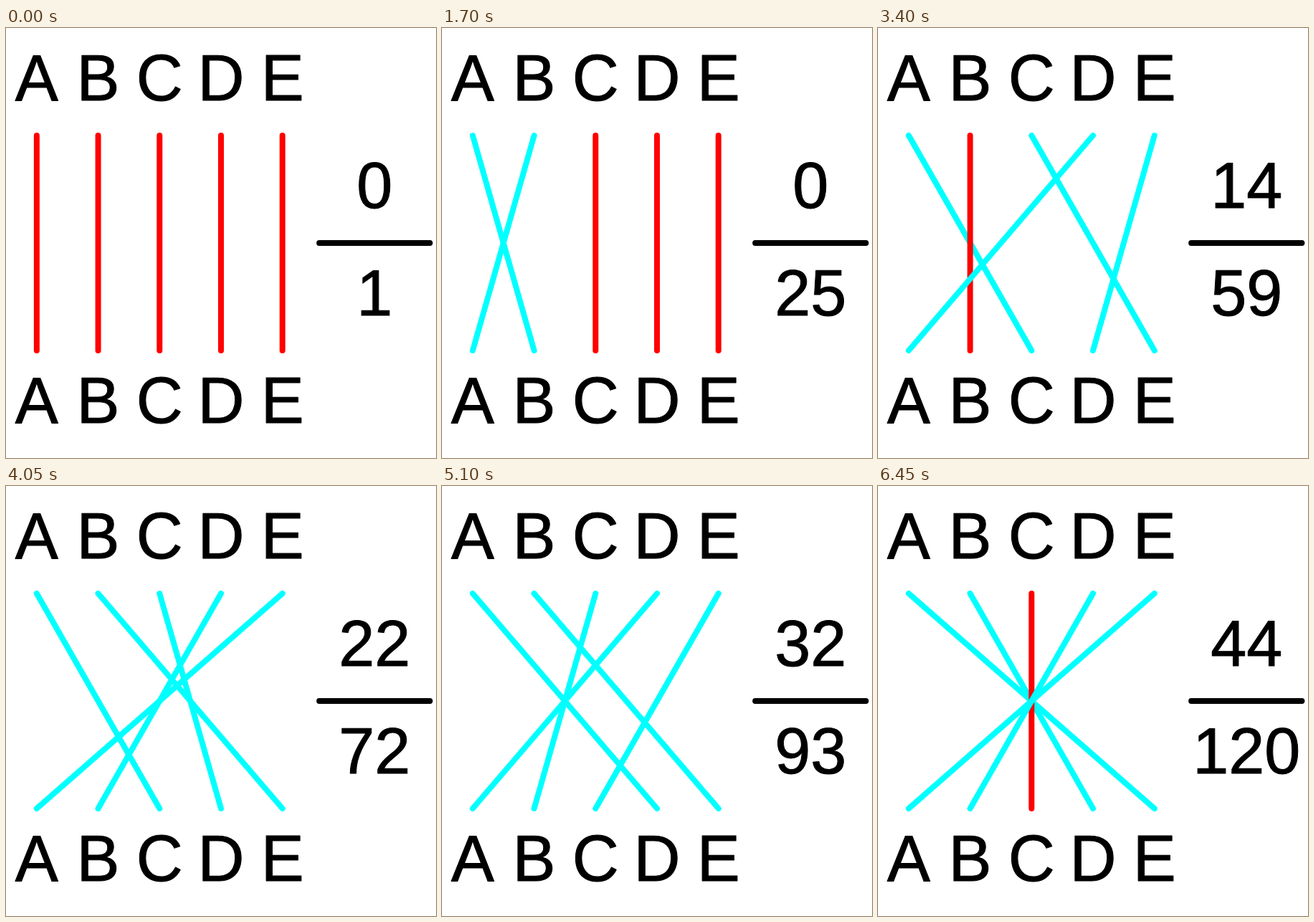
Write an HTML page with a canvas that moves like this. It is 600 by 600 pixels and loops after 7 s.

```html
<!DOCTYPE html>
<html>
<head>
<meta charset="utf-8">
<style>
  html, body { margin: 0; width: 100%; height: 100%; overflow: hidden; background: #fff; }
  canvas { display: block; }
</style>
</head>
<body>
<canvas id="stage" width="600" height="600"></canvas>
<script>
const ctx = document.getElementById('stage').getContext('2d');
const LETTERS = [...'ABCDE'];
const UNIT = 600 / 7;
const HOLD = 550, STEP = 50, LOOP = 7000;

// All orderings, in lexicographic order
const permute = items => items.length
  ? items.flatMap(x => permute(items.filter(y => y !== x)).map(rest => [x, ...rest]))
  : [[]];

// Each state carries the running count of derangements
let count = 0;
const states = permute([0, 1, 2, 3, 4]).map(order => {
  if (order.every((to, from) => to !== from)) count++;
  return { order, count };
});

const columnX = i => (i + 0.5) * UNIT;

function line(x1, y1, x2, y2, color) {
  ctx.strokeStyle = color;
  ctx.lineWidth = 8;
  ctx.beginPath();
  ctx.moveTo(x1, y1);
  ctx.lineTo(x2, y2);
  ctx.stroke();
}

function label(text, x, baseline) {
  ctx.strokeStyle = '#000';
  ctx.lineWidth = 1;
  ctx.fillText(text, x, baseline);
  ctx.strokeText(text, x, baseline);
}

function draw(index) {
  const { order, count } = states[index];
  ctx.fillStyle = '#fff';
  ctx.fillRect(0, 0, 600, 600);
  ctx.fillStyle = '#000';
  ctx.font = '90px "Liberation Sans", Arial, sans-serif';
  ctx.textAlign = 'center';
  ctx.lineCap = 'round';
  ctx.lineJoin = 'round';

  LETTERS.forEach((letter, i) => {
    label(letter, columnX(i), 100.5);
    label(letter, columnX(i), 550.5);
  });
  order.forEach((to, from) =>
    line(columnX(from), 150, columnX(to), 450, to === from ? '#f00' : '#0ff'));

  label(count, 6 * UNIT, 250.5);
  line(5.1 * UNIT, 300, 6.9 * UNIT, 300, '#000');
  label(index + 1, 6 * UNIT, 400.5);
}

function frame() {
  const t = performance.now() % LOOP;
  const index = t < HOLD ? 0 : 1 + Math.floor((t - HOLD) / STEP);
  draw(Math.min(index, states.length - 1));
  requestAnimationFrame(frame);
}
frame();
</script>
</body>
</html>
```
